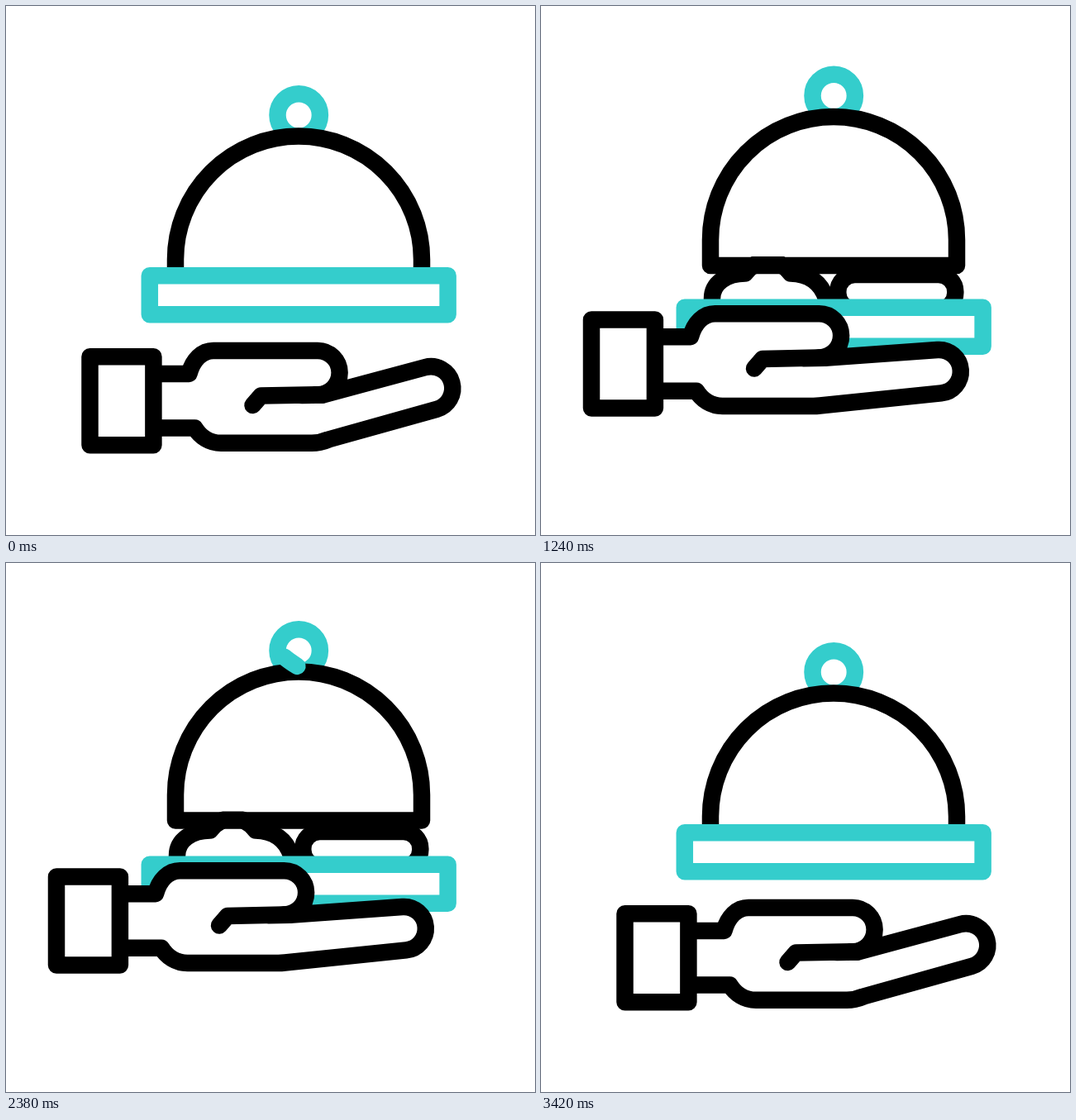
An HTML page with a canvas for the animation above (3600 ms loop, 640x640 px).

```html
<!DOCTYPE html>
<html lang="en">
<head>
<meta charset="utf-8">
<title>Serving dish</title>
<style>
html, body { margin: 0; width: 100%; height: 100%; overflow: hidden; background: #fff; }
canvas { display: block; width: 100vw; height: 100vh; }
</style>
</head>
<body>
<canvas id="stage" width="640" height="640"></canvas>
<script>
const ctx = document.getElementById('stage').getContext('2d');
const LOOP = 3600, TEAL = '#34cdcc', BLACK = '#000', WIDTH = 20.5;
const DROP = 38.5, LIFT = 123;

// Hand shapes: tip centre, tip angles, finger base, underside, thumb
const OPEN = { tipX: 514, tipY: 462.5, upper: -.265, lower: -.272, baseX: 383, baseY: 470.5,
  underX: 390, underY: 524.5, thumbX: 377, thumbY: 443.6, thumbTilt: 0, creaseY: 471.5 };
const FLAT = { tipX: 522, tipY: 487, upper: -.072, lower: -.104, baseX: 384, baseY: 470.5,
  underX: 378, underY: 528.3, thumbX: 377, thumbY: 443.6, thumbTilt: 0, creaseY: 471.8 };
const LOOSE = { tipX: 517, tipY: 469.3, upper: -.2, lower: -.238, baseX: 406, baseY: 464.3,
  underX: 389, underY: 527.5, thumbX: 375.2, thumbY: 435.2, thumbTilt: -.085, creaseY: 470 };

// Steam: centre, head start, tail start
const STEAM = [[435.5, 1414, 1488], [262.5, 1516, 1585], [348.5, 1593, 1670]];
const WISP = 'M0 252C-8 247-18 238-18 229C-18 213 18 217 18 203C18 187-18 190-18 174' +
  'C-18 156 20 158 20 142C20 131 2 126-12 113.5';
const wispPath = new Path2D(WISP);
const wispNode = document.createElementNS('http://www.w3.org/2000/svg', 'path');
wispNode.setAttribute('d', WISP);
const wispLength = wispNode.getTotalLength();

const domePath = new Path2D('M205 337.5V306.5A149 149 0 0 1 503 306.5V337.5Z');
const bunPath = new Path2D('M207 358V354C207 335 225 323.5 247 323.5C255 313 265 308.5 274.5 308.5' +
  'C284 308.5 294 313 302 323.5C325 324 339 335 345 354V358');
const trayPath = new Path2D('M173.8 326.2H534.6V373.3H173.8Z');
const cuffPath = new Path2D('M101.5 424.3H178.4V531.3H101.5Z');
const pattyPath = new Path2D();
pattyPath.roundRect(359.3, 325, 142, 42.5, 20.5);

const linear = (t, a, b) => Math.min(1, Math.max(0, (t - a) / (b - a)));
const ease = (t, a, b) => { const p = linear(t, a, b); return p * p * (3 - 2 * p); };
const mix = (a, b, p) => a + (b - a) * p;

function blend(from, to, p) {
  const pose = {};
  for (const key in from) pose[key] = mix(from[key], to[key], p);
  return pose;
}

function outline(path, color, fill) {
  if (fill) { ctx.fillStyle = '#fff'; ctx.fill(path); }
  ctx.strokeStyle = color;
  ctx.stroke(path);
}

function shifted(x, y, draw) {
  ctx.save();
  ctx.translate(x, y);
  draw();
  ctx.restore();
}

function drawDome(y) {
  shifted(0, y, () => {
    const knob = new Path2D();
    knob.arc(354.2, 132, 25.7, 0, Math.PI * 2);
    outline(knob, TEAL, true);
    outline(domePath, BLACK, true);
  });
}

// Only the part of the food below the lid's rim shows
function drawFood(y, rim) {
  ctx.save();
  ctx.beginPath();
  ctx.rect(0, rim, 640, 640);
  ctx.clip();
  ctx.translate(0, y);
  outline(bunPath, BLACK);
  outline(pattyPath, BLACK);
  ctx.restore();
}

function drawHand(x, y, h) {
  const quarter = Math.PI / 2;
  const body = new Path2D();
  body.moveTo(178.4, 445);
  body.lineTo(221.5, 445);
  body.bezierCurveTo(226, 428, 237, 417, 251, 417);
  body.arc(h.thumbX, h.thumbY, 26.6, h.thumbTilt - quarter, h.thumbTilt + quarter);
  body.lineTo(h.baseX, h.baseY);
  body.arc(h.tipX, h.tipY, 26.3, h.upper - quarter, h.lower + quarter);
  body.lineTo(h.underX, h.underY);
  body.quadraticCurveTo((370 + h.underX) / 2, 528.8, 370, 528.8);
  body.lineTo(260, 528.8);
  body.bezierCurveTo(246, 528.8, 235, 521, 228.5, 510.6);
  body.lineTo(178.4, 510.6);

  const crease = new Path2D();
  crease.moveTo(298.5, h.creaseY + 11.5);
  crease.lineTo(308.5, h.creaseY);
  crease.lineTo(h.thumbX - 26.6 * Math.sin(h.thumbTilt), h.thumbY + 26.6 * Math.cos(h.thumbTilt));
  crease.moveTo(358, h.baseY + .6);
  crease.lineTo(h.baseX, h.baseY);

  shifted(x, y, () => {
    outline(body, BLACK, true);
    ctx.lineCap = 'round';
    outline(crease, BLACK);
    ctx.lineCap = 'butt';
    outline(cuffPath, BLACK, true);
  });
}

function drawSteam(t) {
  ctx.save();
  ctx.lineCap = 'round';
  for (const [x, headStart, tailStart] of STEAM) {
    const head = linear(t, headStart, headStart + 370) * wispLength;
    const tail = linear(t, tailStart, tailStart + 780) * wispLength;
    if (head - tail < .5) continue;
    ctx.setLineDash([head - tail, 2 * wispLength]);
    ctx.lineDashOffset = -tail;
    shifted(x, 0, () => outline(wispPath, TEAL));
  }
  ctx.restore();
}

function handState(t) {
  if (t < 2540) {
    const reach = ease(t, 0, 370), settle = ease(t, 370, 740);
    return [-40.5 * reach, -56 * reach + 11.2 * settle, blend(OPEN, FLAT, ease(t, 0, 740))];
  }
  const fall = ease(t, 2540, 2890), rise = ease(t, 2890, 3420);
  const pose = t < 2890 ? blend(FLAT, LOOSE, fall) : blend(LOOSE, OPEN, rise);
  return [mix(-40.5, 0, fall), mix(mix(-44.8, 49, fall), 0, rise), pose];
}

function draw(t) {
  ctx.fillStyle = '#fff';
  ctx.fillRect(0, 0, 640, 640);
  ctx.lineWidth = WIDTH;
  ctx.lineJoin = 'round';
  const tray = DROP * (ease(t, 0, 740) - ease(t, 2533, 3266));
  const dome = tray - LIFT * (ease(t, 1060, 1420) - ease(t, 2206, 2568));
  drawDome(dome);
  drawFood(tray - DROP, dome + 326.5);
  shifted(0, tray, () => outline(trayPath, TEAL, true));
  drawHand(...handState(t));
  drawSteam(t);
}

const start = performance.now();
function tick() {
  draw((performance.now() - start) % LOOP);
  requestAnimationFrame(tick);
}
tick();
</script>
</body>
</html>
```
